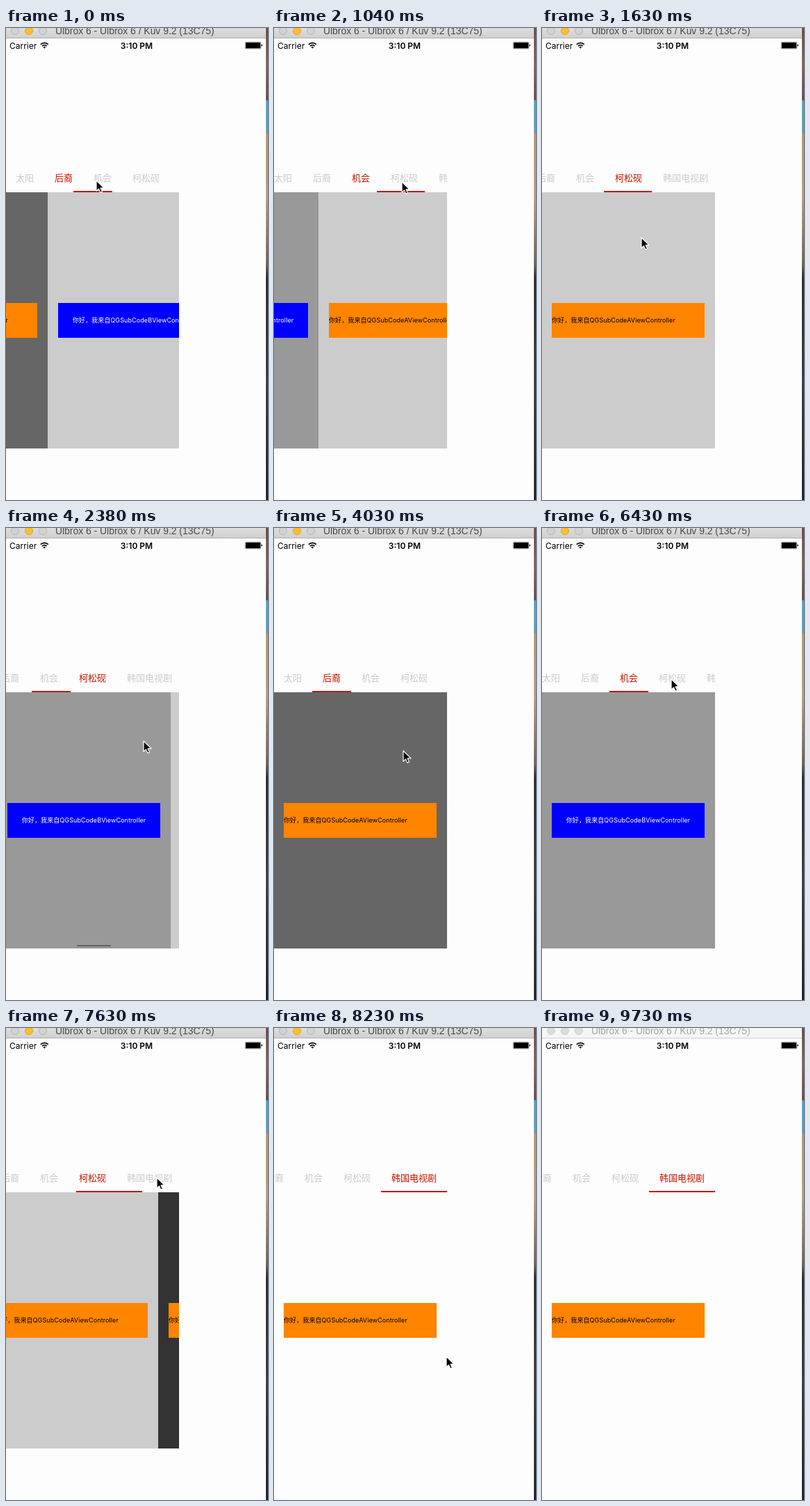
Recreate the animation shown at these times as an HTML page. Size 377 by 678 pixels, loop 9.76 s.

```html
<!DOCTYPE html>
<html lang="zh-CN">
<head>
<meta charset="utf-8">
<title>Tab pager</title>
<style>
  html, body { margin: 0; width: 100%; height: 100%; overflow: hidden; background: #fdfdfd; }
  svg { display: block; width: 377px; height: 678px; }
  text { font-family: Inter, "Noto Sans CJK SC", "Noto Sans CJK", sans-serif; white-space: pre; }
  .title { font: 13.9px "Liberation Sans", Arial, sans-serif; }
  .status { font-size: 12px; }
  .tab { font-size: 13px; }
  .label { font-size: 9px; letter-spacing: .1px; }
</style>
</head>
<body>
<svg id="stage" viewBox="0 0 377 678" xmlns="http://www.w3.org/2000/svg">
  <defs>
    <linearGradient id="bar" x1="0" y1="0" x2="0" y2="1">
      <stop offset="0" stop-color="#dddddd"/><stop offset="1" stop-color="#d0d0d0"/>
    </linearGradient>
    <linearGradient id="desk" x1="0" y1="0" x2="0" y2="1">
      <stop offset="0" stop-color="#6d4c46"/><stop offset=".08" stop-color="#8a5f55"/>
      <stop offset=".152" stop-color="#6b4b48"/><stop offset=".154" stop-color="#4ba6cb"/>
      <stop offset=".221" stop-color="#55a3bf"/><stop offset=".224" stop-color="#bd9468"/>
      <stop offset=".36" stop-color="#c09a78"/><stop offset=".5" stop-color="#75604f"/>
      <stop offset=".53" stop-color="#2a2a32"/><stop offset=".75" stop-color="#3a3a44"/>
      <stop offset="1" stop-color="#20212b"/>
    </linearGradient>
    <clipPath id="view"><rect x="0" y="200" width="249" height="404"/></clipPath>
  </defs>

  <rect width="374" height="678" fill="#fdfdfd"/>
  <rect x="374" width="3" height="678" fill="url(#desk)"/>

  <rect id="head" width="374" height="14" fill="url(#bar)"/>
  <rect id="rule" y="14" width="374" height="1" fill="#b1b1b1"/>
  <g id="dots">
    <circle cx="13" cy="4" r="5.5"/><circle cx="33" cy="4" r="5.5"/><circle cx="53" cy="4" r="5.5"/>
  </g>
  <text id="title" class="title" x="71" y="9">Ulbrox 6 - Ulbrox 6 / Kuv 9.2 (13C75)</text>

  <text class="status" x="5" y="29.5">Carrier</text>
  <g fill="none" stroke="#000" stroke-width="1.7">
    <path d="M49.8 23.6a7.8 7.8 0 0 1 11 0"/>
    <path d="M51.9 26a4.8 4.8 0 0 1 6.8 0"/>
  </g>
  <path d="M55.3 29.6l-1.9-2a2.7 2.7 0 0 1 3.8 0z"/>
  <text class="status" x="188" y="29.5" text-anchor="middle" font-weight="600">3:10 PM</text>
  <rect x="344.25" y="20.25" width="22.5" height="9.5" rx="1.5" fill="#fff" stroke="#000" stroke-width=".5"/>
  <rect x="345" y="21" width="21" height="8" rx=".8"/>
  <path d="M367.5 23.4q1.5 .3 1.5 1.6t-1.5 1.6z"/>

  <g clip-path="url(#view)">
    <g id="pages"></g>
    <rect id="thumb" y="599" width="49" height="2" rx="1" fill="#000"/>
    <g id="tabs"></g>
    <rect id="line" y="234" height="2" fill="#c81400"/>
  </g>

  <path id="cursor" d="M0 0V15.2L3.5 11.9L5.8 17.2L8.4 16.1L6.1 10.9H11Z"
        fill="#000" stroke="#fff" stroke-width="1.2" stroke-linejoin="round"/>
</svg>
<script>
const LOOP = 9760, PITCH = 250, BLUR_AT = 9730;
const $ = id => document.getElementById(id);

const tabs = [
  { name: "太阳", text: 14, left: -1, width: 56, scroll: 0, color: "#333333" },
  { name: "后裔", text: 70, left: 55, width: 56, scroll: 0, color: "#666666" },
  { name: "机会", text: 126, left: 111, width: 56, scroll: 14, color: "#999999", blue: true },
  { name: "柯松砚", text: 182, left: 166.4, width: 69, scroll: 77, color: "#cccccc" },
  { name: "韩国电视剧", text: 251, left: 236, width: 95, scroll: 82, color: "#fdfdfd" }
];

// tint: colour the incoming page keeps until it settles
const moves = [
  { at: -203.5, from: 1, to: 2, tint: "#cccccc" },
  { at: 700, from: 2, to: 3 },
  { at: 1958, from: 3, to: 2, drag: true },
  { at: 3050, from: 2, to: 1, drag: true },
  { at: 4350, from: 1, to: 0, drag: true },
  { at: 5915, from: 0, to: 2 },
  { at: 6665, from: 2, to: 3 },
  { at: 7565, from: 3, to: 4, tint: "#333333" }
];

// time, x, y of the pointer
const path = [
  [0, 130, 219], [250, 132, 219], [650, 186, 217], [900, 184, 221],
  [1630, 143, 301], [1930, 128, 309], [2380, 198, 306], [2600, 194, 311],
  [2980, 122, 318], [3480, 190, 317], [4030, 186, 320], [4330, 125, 318],
  [4780, 192, 314], [5080, 170, 270], [5380, 130, 228], [5530, 130.5, 225],
  [6130, 131, 225], [6430, 186, 217], [6880, 186, 217], [7180, 217, 215],
  [7630, 217, 215], [8230, 248, 472], [8380, 248, 472], [8980, 291, 583]
];

const clamp = v => Math.min(1, Math.max(0, v));
const mix = (a, b, u) => a + (b - a) * u;
const smooth = u => u * u * (3 - 2 * u);
const easeOut = u => 1 - (1 - u) * (1 - u);

function make(tag, attrs, parent, text) {
  const el = document.createElementNS("http://www.w3.org/2000/svg", tag);
  set(el, attrs);
  if (text) el.textContent = text;
  return parent.appendChild(el);
}
function set(el, attrs) {
  for (const k in attrs) el.setAttribute(k, attrs[k]);
}

for (const tab of tabs) {
  tab.label = make("text", { class: "tab", x: tab.text, y: 220 }, $("tabs"), tab.name);
  tab.page = make("g", {}, $("pages"));
  tab.back = make("rect", { y: 236, width: PITCH, height: 368 }, tab.page);
  make("rect", { x: 15, y: 395, width: 220, height: 50, fill: tab.blue ? "#0000ff" : "#ff8400" }, tab.page);
  make("text", {
    class: "label", y: 423, x: tab.blue ? 125 : 15, fill: tab.blue ? "#fff" : "#000",
    "text-anchor": tab.blue ? "middle" : "start"
  }, tab.page, `你好，我来自QGSubCode${tab.blue ? "B" : "A"}ViewController`);
}

function pointer(t) {
  const i = path.findIndex(p => p[0] > t);
  if (i < 0) return path[path.length - 1].slice(1);
  const a = path[i - 1], b = path[i];
  const u = smooth((t - a[0]) / (b[0] - a[0]));
  return [mix(a[1], b[1], u), mix(a[2], b[2], u)];
}

function drawPager(t) {
  const move = moves.filter(m => m.at <= t).pop();
  const span = move.drag ? 540 : 300;
  const u = clamp((t - move.at) / span);
  const done = u === 1;
  const pos = mix(move.from, move.to, (move.drag ? easeOut : smooth)(u));
  const rest = t - move.at - span;
  const to = tabs[move.to];
  const scroll = Math.round(mix(tabs[move.from].scroll, to.scroll, smooth(clamp(rest / 200))));

  tabs.forEach((tab, i) => {
    const active = i === (done ? move.to : move.from);
    set(tab.label, { fill: active ? "#c81400" : "#cbcbcb" });
    const x = Math.round(-1 + (i - pos) * PITCH);
    set(tab.page, { transform: `translate(${x} 0)`, display: Math.abs(x) < PITCH ? "inline" : "none" });
    set(tab.back, { fill: !done && i === move.to && move.tint || tab.color });
  });

  const low = Math.floor(pos);
  const left = tabs[low].left + (pos - low) * to.width;
  set($("tabs"), { transform: `translate(${-scroll} 0)` });
  set($("line"), { x: Math.round(left - scroll), width: to.width });
  set($("thumb"), {
    x: Math.round(pos * 249 / tabs.length),
    opacity: move.drag ? .35 * (1 - clamp(rest / 300)) : 0
  });
}

function drawWindow(active) {
  set($("head"), { fill: active ? "url(#bar)" : "#f6f6f6" });
  set($("rule"), { fill: active ? "#b1b1b1" : "#cfcfcf" });
  set($("title"), { fill: active ? "#484848" : "#a5a5a5" });
  [...$("dots").children].forEach((dot, i) => {
    const lit = active && i === 1;
    set(dot, {
      fill: lit ? "#ffbd2e" : active ? "#d2d2d2" : "#dcdcdc",
      stroke: lit ? "#e1a325" : active ? "#b5b5b5" : "#d0d0d0"
    });
  });
  set($("cursor"), { display: active ? "inline" : "none" });
}

// The screen refreshes every 150 ms, with one shorter step before 1180.
function draw(ms) {
  const base = ms < 1180 ? 0 : 1180;
  const t = base + Math.floor((ms - base) / 150) * 150;
  drawPager(t);
  drawWindow(t < BLUR_AT);
  const [x, y] = pointer(t);
  set($("cursor"), { transform: `translate(${x} ${y})` });
}

const start = performance.now();
function tick() {
  draw((performance.now() - start) % LOOP);
  requestAnimationFrame(tick);
}
tick();
</script>
</body>
</html>
```
